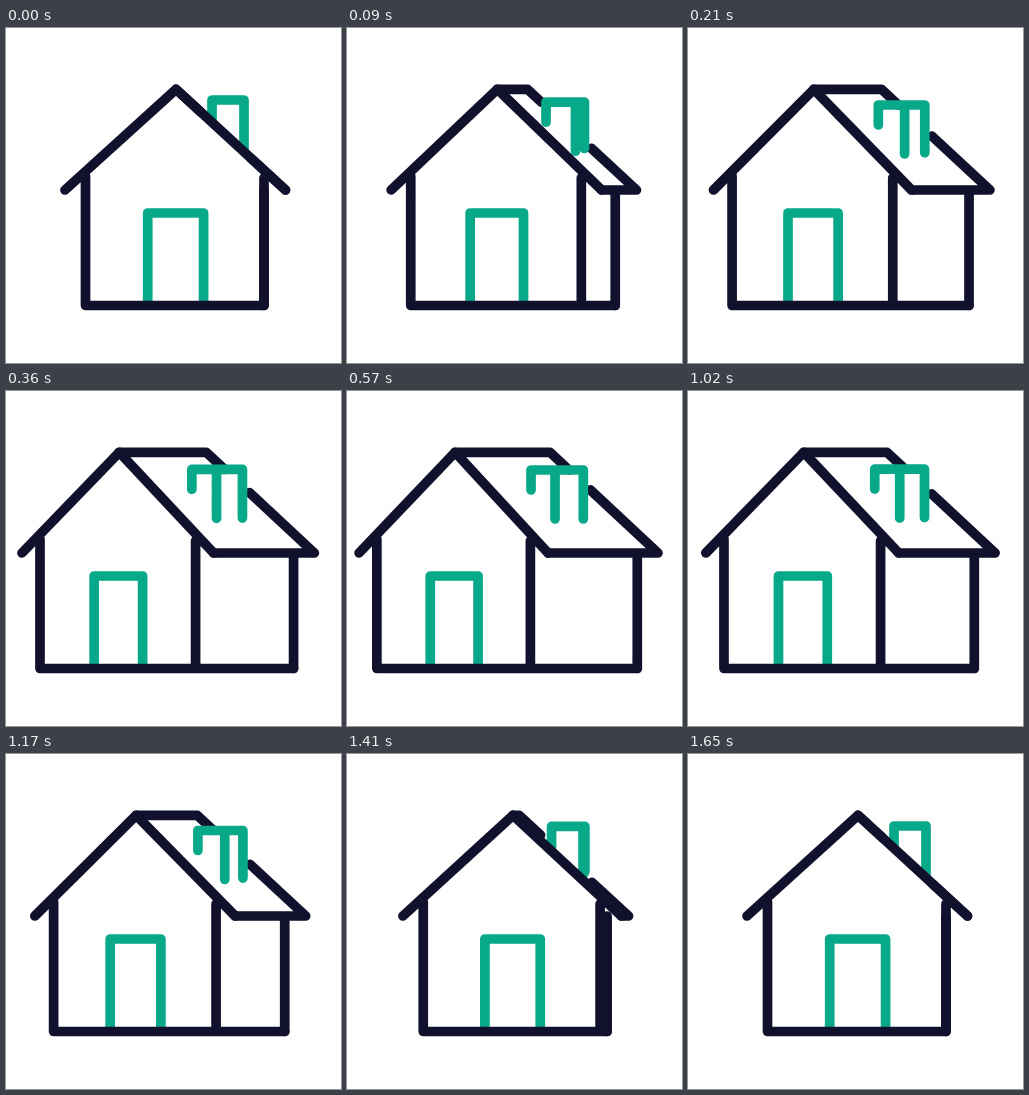
Write an HTML page that moves like this. It is 335x335 px and loops after 1710 ms.

```html
<!DOCTYPE html>
<html lang="en">
<head>
<meta charset="utf-8">
<title>House</title>
<style>
  html, body { margin: 0; width: 100%; height: 100%; overflow: hidden; background: #fff; }
  svg { display: block; width: 100%; height: 100%; }
  path { fill: none; stroke-width: 9.7; stroke-linecap: round; stroke-linejoin: round; }
  .navy { stroke: #11112d; }
  .green { stroke: #08a989; }
</style>
</head>
<body>
<svg viewBox="0 0 335 335">
  <path id="back" class="navy"/>
  <path id="chimney" class="green"/>
  <path id="door" class="green"/>
  <path id="front" class="navy"/>
</svg>
<script>
const LOOP = 1710, STEP = 30, TURN = 600, END = 1650;
const RIDGE = 61.3, EAVE = 162, BASE = 277.5;

const [back, chimney, door, front] =
  ['back', 'chimney', 'door', 'front'].map(id => document.getElementById(id));

const clamp = v => Math.min(1, Math.max(0, v));

// Cubic bezier easing with flat ends: handles (x1, 0) and (x2, 1)
function ease(x, x1, x2) {
  let lo = 0, hi = 1;
  for (let i = 0; i < 30; i++) {
    const s = (lo + hi) / 2, r = 1 - s;
    if (3 * r * r * s * x1 + 3 * r * s * s * x2 + s * s * s < x) lo = s;
    else hi = s;
  }
  return lo * lo * (3 - 2 * lo);
}

// 0 = seen from the front, 1 = fully turned
function turnAt(t) {
  return t < TURN
    ? ease(t / TURN, 0.167, 0.09)
    : 1 - ease(clamp((t - TURN) / (END - TURN)), 0.87, 0.35);
}

const line = (...pts) => 'M' + pts.map(p => p.map(n => n.toFixed(2)).join(' ')).join('L');

function draw(t) {
  const p = turnAt(t);
  const mix = (a, b) => a + (b - a) * p;

  const apex = mix(170, 108), rearApex = mix(170, 203);
  const eaveL = mix(59, 12), eaveR = mix(279.5, 201), rearEave = mix(279.5, 311);
  const wallL = mix(79.5, 29.8), corner = mix(258, 183.3), wallR = mix(258, 290.3);
  const doorL = mix(141.7, 83.2), doorR = mix(197.6, 131);
  const left = mix(206, 184), mid = mix(238, 208), right = mix(238, 236.3);
  const top = mix(72, 79);

  // The rear slope is interrupted by the chimney
  const slope = (EAVE - RIDGE) / (rearEave - rearApex);
  const onSlope = x => [x, RIDGE + (x - rearApex) * slope];
  const gapStart = Math.max(left - 11, rearApex + (top - RIDGE) / slope);

  back.setAttribute('d',
    line([apex, RIDGE], [rearApex, RIDGE], onSlope(gapStart)) +
    line(onSlope(right + 7), [rearEave, EAVE], [eaveR, EAVE]) +
    line([wallR, EAVE], [wallR, BASE]));

  chimney.setAttribute('d',
    line([left, mix(92, 99)], [left, top], [right, top], [right, mix(117, 128)]) +
    line([mid, top], [mid, mix(121, 128)]));

  door.setAttribute('d',
    line([doorL, BASE - 5], [doorL, 185], [doorR, 185], [doorR, BASE - 5]));

  front.setAttribute('d',
    line([eaveL, EAVE], [apex, RIDGE], [eaveR, EAVE]) +
    line([wallL, 148], [wallL, BASE], [wallR, BASE]) +
    line([corner, 150], [corner, BASE]));
}

const start = performance.now();
function tick() {
  const t = (performance.now() - start) % LOOP;
  draw(Math.floor(t / STEP) * STEP);
  requestAnimationFrame(tick);
}
tick();
</script>
</body>
</html>
```
